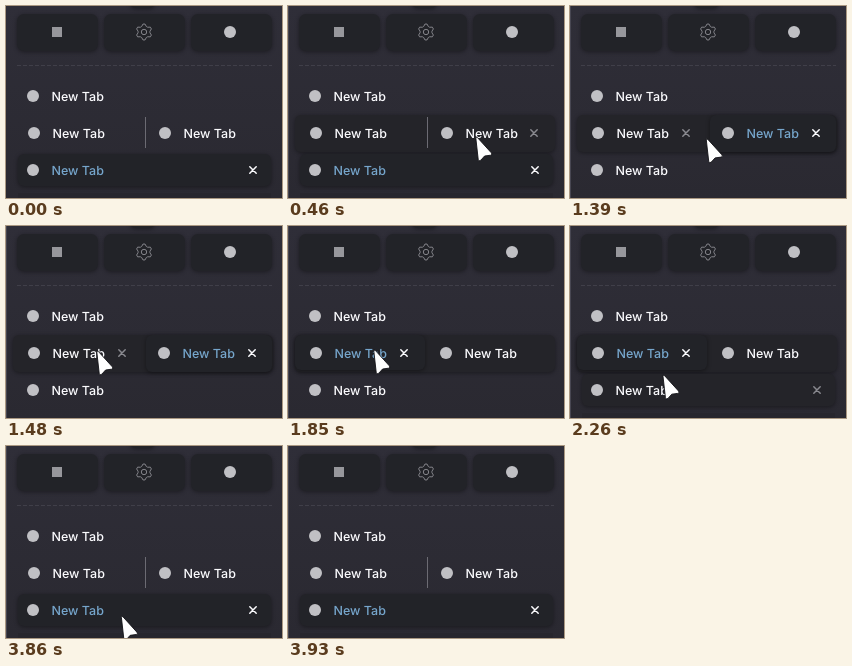
These frames come from a looping animation (276 by 192 pixels, 4.42 s). An HTML page:

```html
<!DOCTYPE html>
<html lang="en">
<head>
<meta charset="utf-8">
<title>Split tabs</title>
<style>
  html, body { margin: 0; width: 100%; height: 100%; overflow: hidden; background: #2d2c35; }
  svg { display: block; width: 276px; height: 192px; }
  text { font: 500 12.5px Inter, Roboto, sans-serif; fill: #fbfbfe; text-rendering: geometricPrecision; }
  .active { fill: #76a6cc; }
  .box { fill: #222328; filter: drop-shadow(0 1px 2px #0006); }
  .hover { fill: #242429; }
  .icon { fill: #c0c0c4; }
  .cross { fill: none; stroke: #fbfbfe; stroke-width: 1.5; stroke-linecap: round; }
  .dim { stroke: #89898f; }
</style>
</head>
<body>
<svg viewBox="0 0 276 192">
  <defs>
    <linearGradient id="bg" x2="0" y2="1">
      <stop stop-color="#2f2e38"/><stop offset="1" stop-color="#2a2931"/>
    </linearGradient>
  </defs>
  <rect width="276" height="192" fill="url(#bg)"/>
  <rect id="edge" width="1" height="192" fill="#484752"/>
  <rect class="box" x="124" y="-12" width="25" height="14" rx="6"/>
  <rect class="box" x="11" y="8" width="81" height="37" rx="7"/>
  <rect class="box" x="98" y="8" width="81" height="37" rx="7"/>
  <rect class="box" x="185" y="8" width="81" height="37" rx="7"/>
  <rect x="46" y="21" width="10" height="10" fill="#97979c"/>
  <g transform="translate(138 26)" fill="none" stroke="#84848a" stroke-linejoin="round">
    <path id="gear"/><circle r="2.7"/>
  </g>
  <circle class="icon" cx="224" cy="26" r="6"/>
  <path d="M11 59.5H266" stroke="#403f49" stroke-dasharray="4 2"/>
  <g id="tabs"></g>
  <path id="cursor" d="M.8 1 3.2 22.3Q3.6 25 5.8 23.2L9.6 19 15.6 18.2Q18 17.6 16.3 15.8L2.4 .5Q.6-.8 .8 1Z"
    fill="#fff" stroke="#111116" stroke-width=".9" stroke-linejoin="round"/>
</svg>
<script>
const $ = id => document.getElementById(id);
const LOOP = 4420;

// Cursor stops: time, x, y
const moves = [
  [340, 266, 188], [390, 228, 158], [460, 187, 131], [630, 187, 132],
  [1290, 187, 132], [1390, 136, 133], [1480, 90, 125],
  [1730, 90, 125], [1850, 85, 124],
  [2190, 85, 124], [2260, 92, 149], [2380, 115, 170],
  [3860, 115, 170], [3930, 86, 193]
];

// Six-toothed outline
$('gear').setAttribute('d', 'M' + Array.from({ length: 24 }, (_, i) => {
  const a = (i - .5) * Math.PI / 12, r = i % 4 < 2 ? 8 : 6;
  return `${(r * Math.sin(a)).toFixed(2)} ${(-r * Math.cos(a)).toFixed(2)}`;
}).join('L') + 'Z');

function cursorAt(t) {
  const i = moves.findIndex(m => m[0] > t);
  if (i < 1) return null;
  const [t0, x0, y0] = moves[i - 1], [t1, x1, y1] = moves[i];
  const k = (t - t0) / (t1 - t0);
  return { x: x0 + (x1 - x0) * k, y: y0 + (y1 - y0) * k };
}

const box = (x, y, w, h, cls = '') =>
  `<rect class="box ${cls}" x="${x}" y="${y}" width="${w}" height="${h}" rx="6"/>`;

const cross = (x, y, active) =>
  `<path class="cross ${active ? '' : 'dim'}" d="M${x - 3.2} ${y - 3.2}l6.4 6.4m0-6.4l-6.4 6.4"/>`;

const tab = (x, y, active, hover, crossX) =>
  `<circle class="icon" cx="${x}" cy="${y}" r="6"/>` +
  `<text class="${active ? 'active' : ''}" x="${x + 18.5}" y="${y + 4.7}">New Tab</text>` +
  (active || hover ? cross(crossX, y, active) : '');

function scene(t) {
  const active = t < 830 ? 'low' : t < 1760 ? 'right' : t < 2770 ? 'left' : 'low';
  const c = cursorAt(t);
  const over = !c || c.x > 267 ? '' :
    c.y > 148 && c.y < 181 ? 'low' :
    c.y < 109 || c.y > 146 ? '' :
    c.x < 136 ? 'left' : c.x > 140 ? 'right' : 'gap';
  const split = active !== 'low';
  const splitOver = over && over !== 'low';
  let s = '';

  if (split || splitOver) s += box(7, 109, 260, 37, 'hover');
  if (active === 'left') s += box(7, 109, 130, 35);
  if (active === 'right') s += box(140, 109, 126, 37);
  if (!split) s += '<path d="M139.5 111V142" stroke="#6c6b73"/>';
  if (!split || over === 'low') {
    s += '<rect x="12" y="187" width="253" height="5" fill="#27262d"/>';
    s += box(12, 148, 253, 32, split ? 'hover' : '');
  }

  s += tab(27, 90);
  s += tab(28, 127, active === 'left', over === 'left', 116);
  s += tab(split ? 158 : 159, 127, active === 'right', over === 'right', 246);
  s += tab(27, 164, !split, over === 'low', 247);
  return { s, c };
}

let last = '';
function frame(now) {
  const t = now % LOOP, { s, c } = scene(t);
  if (s !== last) $('tabs').innerHTML = last = s;
  $('edge').style.display = t < 90 ? 'none' : '';
  $('cursor').style.display = c ? '' : 'none';
  if (c) $('cursor').setAttribute('transform', `translate(${c.x} ${c.y})`);
  requestAnimationFrame(frame);
}
frame(0);
</script>
</body>
</html>
```
